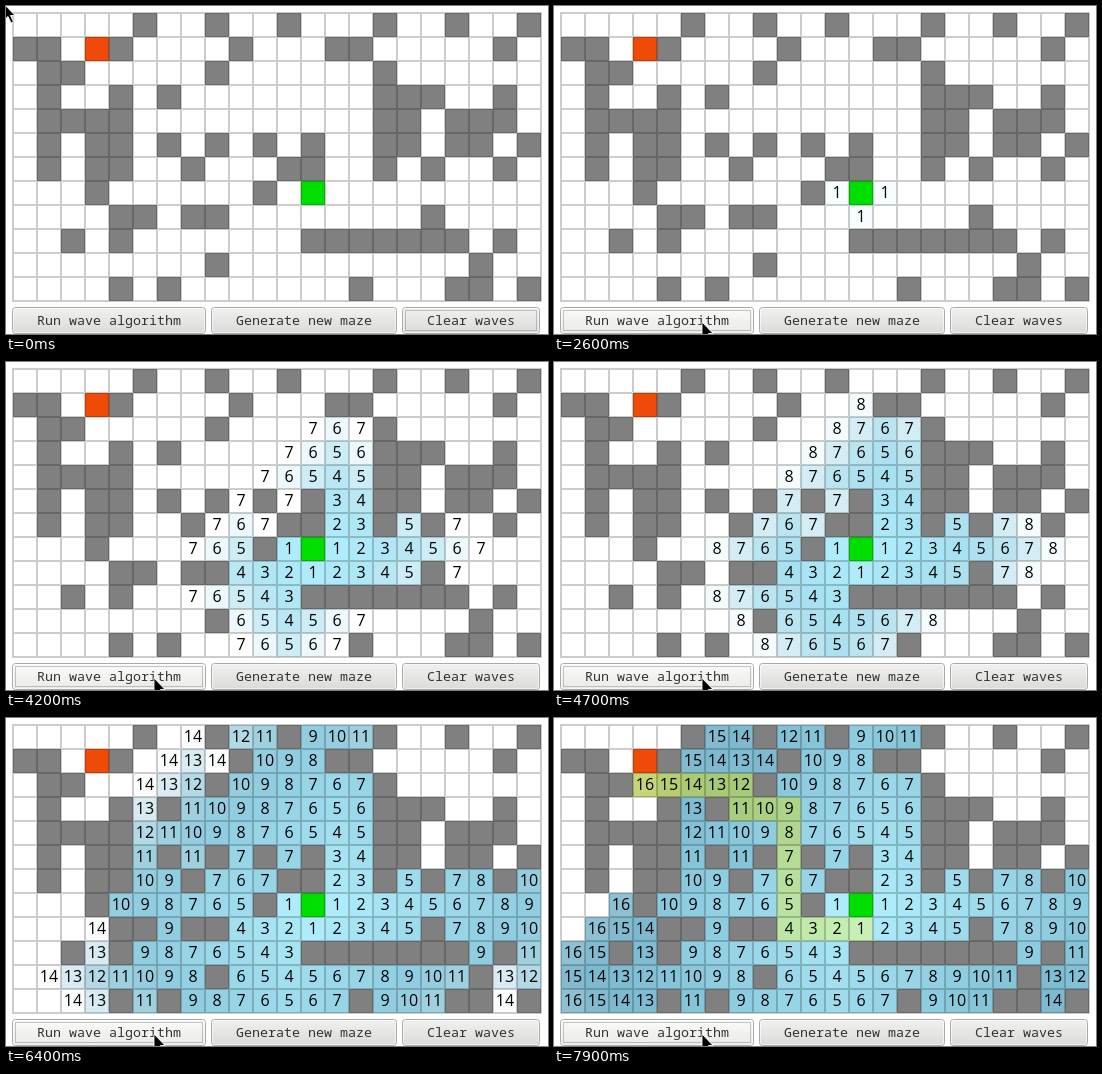
Write an HTML page with a canvas that moves like this. It is 542 px wide and 328 px high and loops after 8 s.

```html
<!DOCTYPE html>
<html lang="en">
<head>
<meta charset="utf-8">
<title>Wave algorithm</title>
<style>
  html, body { margin: 0; width: 100%; height: 100%; overflow: hidden; background: #fff; }
  canvas { display: block; }
</style>
</head>
<body>
<canvas id="stage" width="542" height="328"></canvas>
<script>
const ctx = document.getElementById('stage').getContext('2d');

const LOOP = 8000, TICK = 100;
const WAVE_START = 2100, WAVE_STEP = 300, FADE = 2000;
const PRESS = 2300, RELEASE = 2400;
const CELL = 24, ORIGIN = 7;

const maze = [
  '.....#..#..#...#..#..#',
  '##.R#....#...##.....#.',
  '.##.....#......#......',
  '.#..#.#........###..#.',
  '.####..........##.###.',
  '.#.##.#.#.#.#..##.##.#',
  '.#.##..#...##..#.#..#.',
  '...#......#.G.........',
  '....##.##........#....',
  '..#.#.......#######.#.',
  '........#..........#..',
  '....#.#.......#...##.#'
];
const route = 'DRRRRDRRDDDDDRRR';
const fills = { '#': [128, 128, 128], R: [240, 74, 8], G: [0, 222, 0], '.': [255, 255, 255] };

const find = mark => {
  const row = maze.findIndex(line => line.includes(mark));
  return [row, maze[row].indexOf(mark)];
};

// Breadth-first distances from the green cell
function flood() {
  const levels = maze.map(line => [...line].map(() => -1));
  const queue = [find('G')];
  levels[queue[0][0]][queue[0][1]] = 0;
  for (const [r, c] of queue) {
    for (const [y, x] of [[r - 1, c], [r + 1, c], [r, c - 1], [r, c + 1]]) {
      if (!maze[y] || !maze[y][x] || maze[y][x] === '#' || levels[y][x] >= 0) continue;
      levels[y][x] = levels[r][c] + 1;
      if (maze[y][x] !== 'R') queue.push([y, x]);
    }
  }
  return levels;
}

function trace() {
  const cells = new Set();
  let [r, c] = find('R');
  for (const move of route) {
    if (move === 'D') r++; else c++;
    cells.add(r + ',' + c);
  }
  return cells;
}

const levels = flood();
const path = trace();
const [endRow, endCol] = find('R');
const lastLevel = levels[endRow][endCol] - 1;
const shownAt = level => WAVE_START + WAVE_STEP * level;
const pathAt = shownAt(lastLevel + 1);

// cubic-bezier(.25, .1, .25, 1)
function ease(x) {
  if (x <= 0) return 0;
  if (x >= 1) return 1;
  const bezier = (a, b, u) => 3 * a * u * (1 - u) ** 2 + 3 * b * u * u * (1 - u) + u ** 3;
  let lo = 0, hi = 1;
  for (let i = 0; i < 24; i++) {
    const mid = (lo + hi) / 2;
    if (bezier(.25, .25, mid) < x) lo = mid; else hi = mid;
  }
  return bezier(.1, 1, lo);
}

const mix = (a, b, k) => a.map((v, i) => v + (b[i] - v) * k);
const rgb = color => `rgb(${color.map(Math.round)})`;
const blue = n => [178 - 4 * n, 240 - 4 * n, 254 - 3.4 * n];
const lime = n => [218 - 2.5 * n, 246 - 3.2 * n, 145 - 7 * n];

function waveColor(level, onPath, t) {
  const until = onPath ? Math.min(t, pathAt) : t;
  const color = mix(fills['.'], blue(level), ease((until - shownAt(level)) / FADE));
  return onPath ? mix(color, lime(level), ease((t - pathAt) / FADE)) : color;
}

function drawMaze(t) {
  ctx.strokeStyle = '#ccc';
  ctx.lineWidth = 1;
  ctx.strokeRect(ORIGIN - .5, ORIGIN - .5, CELL * 22 + 1, CELL * 12 + 1);
  ctx.font = '16px "Open Sans", "Noto Sans", sans-serif';
  maze.forEach((line, r) => [...line].forEach((mark, c) => {
    const x = ORIGIN + c * CELL, y = ORIGIN + r * CELL, level = levels[r][c];
    const reached = mark === '.' && level > 0 && level <= lastLevel && t >= shownAt(level);
    ctx.fillStyle = rgb(reached ? waveColor(level, path.has(r + ',' + c), t) : fills[mark]);
    ctx.fillRect(x, y, CELL, CELL);
    ctx.strokeStyle = 'rgba(0,0,0,.2)';
    ctx.strokeRect(x + .5, y + .5, CELL - 1, CELL - 1);
    if (reached) {
      ctx.fillStyle = '#000';
      ctx.fillText(level, x + CELL / 2, y + 17);
    }
  }));
}

function drawButton(label, x, width, { focus, hover, pressed }) {
  const y = 301, height = 27;
  const shade = ctx.createLinearGradient(0, y, 0, y + height);
  const [top, bottom] = pressed ? ['#cfcfcd', '#d6d6d4'] : hover ? ['#fbfbfa', '#e9e9e7'] : ['#f1f1f0', '#dadad8'];
  shade.addColorStop(0, top);
  shade.addColorStop(1, bottom);
  ctx.lineWidth = 1;
  ctx.beginPath();
  ctx.roundRect(x + .5, y + .5, width - 1, height - 1, 3);
  ctx.fillStyle = shade;
  ctx.fill();
  ctx.strokeStyle = '#a9a9a7';
  ctx.stroke();
  if (!pressed) {
    ctx.beginPath();
    ctx.roundRect(x + 1.5, y + 1.5, width - 3, height - 3, 2);
    ctx.strokeStyle = 'rgba(255,255,255,.6)';
    ctx.stroke();
  }
  if (focus) {
    ctx.setLineDash([1, 1]);
    ctx.strokeStyle = '#8c8c8a';
    ctx.strokeRect(x + 3.5, y + 3.5, width - 7, height - 7);
    ctx.setLineDash([]);
  }
  ctx.font = '13.333px "Noto Sans Mono", monospace';
  ctx.fillStyle = '#333';
  ctx.fillText(label, x + width / 2, y + 18);
}

// time, x, y of the pointer tip
const pointerStops = [
  [400, -2, -2], [700, 34, 58], [1000, 98, 186], [1300, 148, 293],
  [1400, 152, 312], [1500, 154, 323], [1600, 154, 326], [1700, 153, 325], [2000, 148, 316]
];

function pointerAt(t) {
  const next = pointerStops.findIndex(stop => stop[0] > t);
  if (next === 0) return pointerStops[0].slice(1);
  if (next < 0) return pointerStops.at(-1).slice(1);
  const a = pointerStops[next - 1], b = pointerStops[next];
  return mix(a, b, (t - a[0]) / (b[0] - a[0])).slice(1).map(Math.round);
}

const arrow = [[0, 0], [0, 16], [4, 12.5], [7, 19], [9.5, 18], [6.5, 11.5], [11, 11.5]];

function drawPointer([x, y]) {
  ctx.beginPath();
  arrow.forEach(([dx, dy]) => ctx.lineTo(x + dx, y + dy));
  ctx.closePath();
  ctx.fillStyle = '#000';
  ctx.fill();
  ctx.strokeStyle = 'rgba(255,255,255,.85)';
  ctx.stroke();
}

function draw(t) {
  const pointer = pointerAt(t);
  const clicked = t >= PRESS;
  ctx.fillStyle = '#fff';
  ctx.fillRect(0, 0, 542, 328);
  ctx.textAlign = 'center';
  drawMaze(t);
  drawButton('Run wave algorithm', 6, 194, {
    focus: clicked,
    hover: pointer[1] > 301 && pointer[1] < 326,
    pressed: clicked && t < RELEASE
  });
  drawButton('Generate new maze', 205, 186, {});
  drawButton('Clear waves', 396, 138, { focus: !clicked });
  drawPointer(pointer);
}

const start = performance.now();
function frame() {
  const t = (performance.now() - start) % LOOP;
  draw(Math.floor(t / TICK) * TICK);
  requestAnimationFrame(frame);
}
frame();
</script>
</body>
</html>
```
